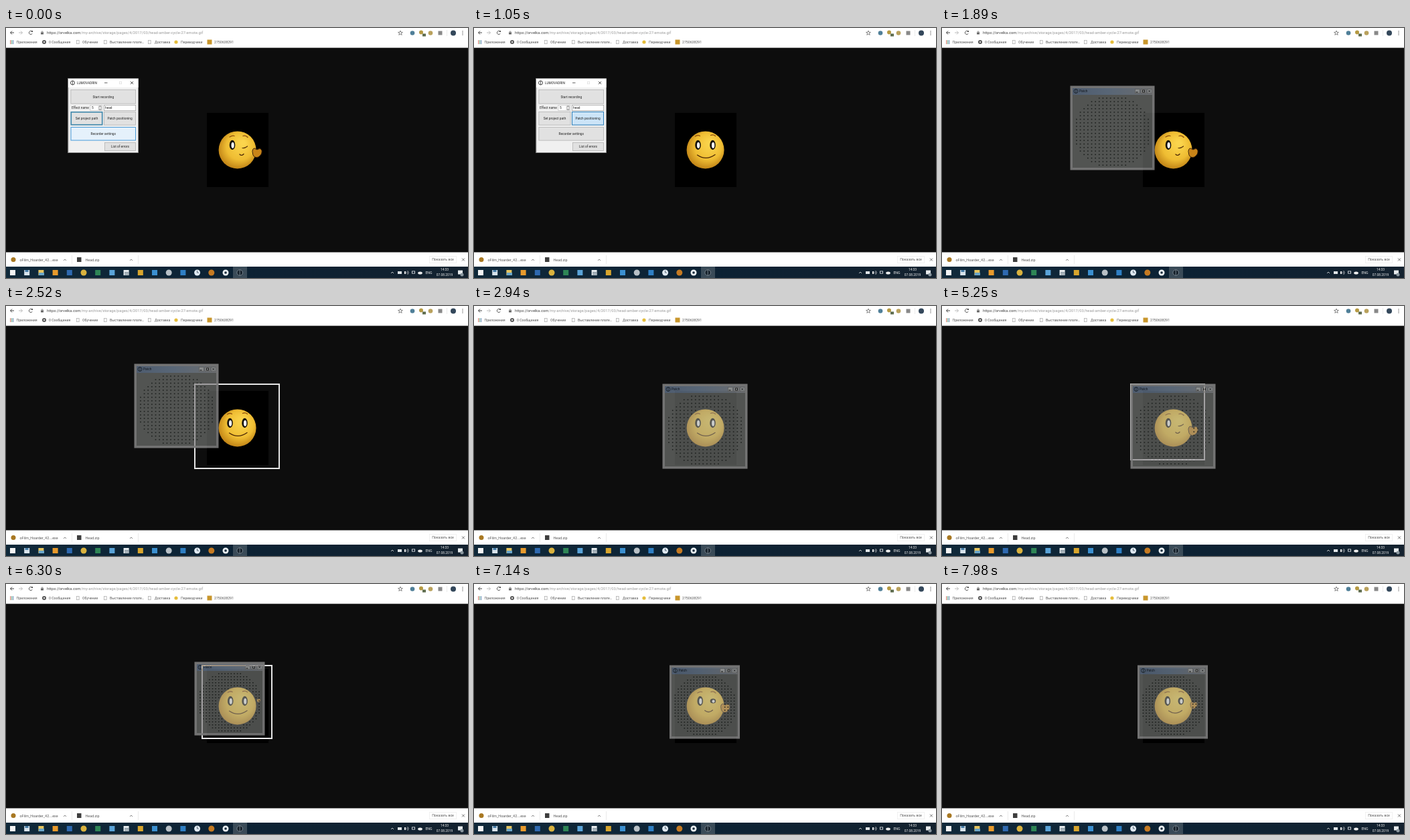
Write an HTML page with a canvas that moves like this. It is 690 by 374 pixels and loops after 8 s.

```html
<!DOCTYPE html>
<html lang="ru">
<head>
<meta charset="utf-8">
<style>
html, body { margin: 0; width: 690px; height: 374px; overflow: hidden; background: #0d0d0d; }
canvas { display: block; }
</style>
</head>
<body>
<canvas id="stage" width="690" height="374"></canvas>
<script>
const g = document.getElementById('stage').getContext('2d');
const LOOP = 8000, STEP = 210, FACE_LOOP = 1650;
const HEAD = { x: 345.6, y: 182.4, r: 28 };

const lerp = (a, b, k) => a + (b - a) * k;
const mix = (a, b, k) => a.map((v, i) => lerp(v, b[i], k));
const ramp = (t, from, to) => Math.min(1, Math.max(0, (t - from) / (to - from)));

function box(x, y, w, h, fill, edge, line = 1) {
  g.fillStyle = fill;
  g.fillRect(x, y, w, h);
  if (!edge) return;
  g.strokeStyle = edge;
  g.lineWidth = line;
  g.strokeRect(x + line / 2, y + line / 2, w - line, h - line);
}

function oval(x, y, rx, ry, fill) {
  g.fillStyle = fill;
  g.beginPath();
  g.ellipse(x, y, rx, ry, 0, 0, 7);
  g.fill();
}

const disc = (x, y, r, fill) => oval(x, y, r, r, fill);

function ring(x, y, r, color, width = 1, from = 0, to = 7) {
  g.strokeStyle = color;
  g.lineWidth = width;
  g.beginPath();
  g.arc(x, y, r, from, to);
  g.stroke();
}

function line(color, width, path) {
  g.strokeStyle = color;
  g.lineWidth = width;
  g.stroke(new Path2D(path));
}

function text(s, x, y, size = 5.2, color = '#555', align = 'left') {
  g.font = size + 'px Roboto, sans-serif';
  g.textAlign = align;
  g.textBaseline = 'middle';
  g.fillStyle = color;
  g.fillText(s, x, y);
  return g.measureText(s).width;
}

function cross(x, y, r, color) {
  line(color, .8, `M${x - r} ${y - r}l${2 * r} ${2 * r}m0 ${-2 * r}l${-2 * r} ${2 * r}`);
}

const caret = (x, y, color) => line(color, .8, `M${x - 2} ${y + 1}l2 -2l2 2`);

function page(x, y) {
  box(x - 2, y - 3, 4.5, 6, '#fafafa', '#aaa', .7);
}

function browser() {
  box(0, 0, 690, 29.6, '#fff');
  line('#444', 1, 'M12 7H6.5M9 4.5L6.5 7L9 9.5');
  line('#bbb', 1, 'M19 7h5.5M22 4.5L24.5 7L22 9.5');
  ring(37, 7, 2.6, '#555', 1, .5, 5.6);
  box(38, 4, 2, 2, '#555');
  box(52, 6.5, 4, 3, '#666');
  ring(54, 6.2, 1.3, '#666', .7, Math.PI, 7);
  const host = 'https://orvelka.com';
  const w = text(host, 61, 7.5, 5.8, '#444');
  text('/my-archive/storage/pages/4/2017/03/head-amber-cycle-27-emote.gif', 61 + w, 7.5, 5.8, '#999');
  line('#666', .8, 'M589 4l1 2.4h2.4l-2 1.5l.8 2.5l-2.2-1.5l-2.2 1.5l.8-2.5l-2-1.5h2.4z');
  disc(607, 7.5, 3.3, '#4f7f98');
  disc(620, 6.5, 3, '#b59a42');
  box(622, 8.5, 5, 4, '#5d6b4c');
  disc(634, 7.5, 3.3, '#b9a15c');
  box(645.5, 4.5, 6, 6, '#888');
  box(658, 3, .6, 9, '#ddd');
  disc(668, 7.5, 4, '#33475a');
  for (const y of [5, 7.5, 10]) disc(682, y, .7, '#555');

  for (let i = 0; i < 9; i++)
    box(6 + i % 3 * 2, 18.5 + Math.floor(i / 3) * 2, 1.4, 1.4, ['#c65', '#5a8', '#68b'][i % 3]);
  disc(57, 21, 3, '#555');
  disc(57, 21, 1.2, '#ddd');
  page(107, 21);
  page(148, 21);
  page(214, 21);
  disc(254, 21, 2.6, '#e5bd3b');
  box(300.5, 17.5, 7, 7, '#c8962c');
  const marks = [['Приложения', 15.5], ['0 Сообщения', 64], ['Обучение', 114], ['Выставление плате…', 155],
    ['Доставка', 222], ['Переводчики', 261], ['2750638291', 311]];
  for (const [s, x] of marks) text(s, x, 21.3);
}

function downloads() {
  box(0, 335.5, 690, 22, '#fff');
  disc(11, 346.5, 3.5, '#a87822');
  text('oFilm_Hoarder_42….exe', 20.5, 347.5, 5.4);
  box(106, 343, 6.5, 7, '#3d3d3d');
  text('Head.zip', 118.5, 347.5, 5.4);
  for (const x of [88, 187]) {
    caret(x, 347, '#666');
    box(x + 10, 340, .7, 13, '#e2e2e2');
  }
  box(632, 341, 41, 11, '#fff', '#ececec', .7);
  text('Показать все', 652.5, 346.7, 5.2, '#555', 'center');
  cross(683, 346.5, 2, '#555');
}

function taskbar() {
  const bg = g.createLinearGradient(0, 0, 690, 0);
  bg.addColorStop(0, '#10293a');
  bg.addColorStop(.5, '#0c2234');
  bg.addColorStop(1, '#14222f');
  box(0, 357, 690, 17, bg);
  box(339, 357, 21, 17, '#3a4b58');
  const apps = ['#f4f4f4', '#d7e3ec', '#e6c560', '#e89a2c', '#2f69b0', '#d9b23e', '#2f8656', '#5aa3d8', '#e8edf0',
    '#d8a52d', '#3b8fd0', '#b8c0c6', '#2f7fc4', '#dfe9f2', '#c57a22', '#e9eef1', '#15202a'];
  apps.forEach((c, i) => {
    const x = 10 + i * 21.2;
    if ([5, 11, 13, 14, 15, 16].includes(i)) disc(x, 366, 4.5, c);
    else box(x - 4, 362, 8, 8, c);
  });
  box(28.5, 362, 5, 3, '#477ea8');
  box(49, 366, 8, 4, '#6aa5c9');
  for (let i = 0; i < 9; i++) box(177.5 + i % 3 * 2, 365 + Math.floor(i / 3) * 1.7, 1.2, 1, '#274052');
  line('#345', .8, 'M285.6 363v3h2.2');
  disc(328, 366, 1.8, '#10293a');
  ring(349.2, 366, 4.3, '#8d9ba5', .8);
  line('#8d9ba5', .8, 'M349.2 362v8');

  caret(577, 366, '#eee');
  box(585, 364, 6, 4, '#dfe5e8');
  box(595, 364, 2, 4, '#eee');
  for (const r of [2, 4]) ring(597, 366, r, '#eee', .7, -.8, .8);
  box(606, 363.5, 5, 4, '#0c2234', '#eee', .8);
  oval(618.5, 366.5, 3.3, 2, '#eee');
  text('ENG', 631.5, 366, 5.2, '#eee', 'center');
  text('14:33', 655, 361.8, 4.9, '#eee', 'center');
  text('07.08.2019', 655, 370, 4.9, '#eee', 'center');
  box(675, 362.5, 7, 6, '#e8ecee');
  disc(681, 369, 2.5, '#8a979f');
}

function face(t) {
  const p = t % FACE_LOOP / FACE_LOOP;
  const cycle = (a, b, c, d) => p > .6 ? ramp(p, a, b) : 1 - ramp(p, c, d);
  const turn = cycle(.81, .85, .32, .42);
  const wink = cycle(.82, .87, .3, .4);

  box(300, 127, 92, 111, '#000');
  const skin = g.createRadialGradient(354, 172, 3, 347, 180, 32);
  skin.addColorStop(0, '#fbd54d');
  skin.addColorStop(.6, '#efbd33');
  skin.addColorStop(1, '#bd7f14');
  disc(HEAD.x, HEAD.y, HEAD.r, skin);

  g.lineCap = 'round';
  const lx = 334.5 + 3.5 * turn, rx = 356.5 + turn / 2;
  line('#8a4a0c', 1.3, `M${lx - 4} ${162 + turn}q4 -2.5 7 -${.5 + turn}`);
  line('#8a4a0c', 1.3, `M${rx - 3} ${160.5 + turn}q4 -1.5 7 ${1 + wink}`);
  const eye = (x, open) => {
    oval(x, 175, 4.3, 7.2 * open, '#17130d');
    oval(x + .6, 175.5, 2.1, 4.4 * open, '#fff');
  };
  eye(lx, 1);
  if (wink < .8) eye(rx, 1 - wink * .7);
  else line('#5b370a', 1.2, 'M353 179.5q4 .5 7.5 -2.5');
  const [x0, y0, x1, sag] = mix([333.5, 190, 360, 9], [349, 189, 355, 3], wink);
  line('#4a2605', 1.3, `M${x0} ${y0}Q${(x0 + x1) / 2} ${y0 + sag} ${x1} ${y0 - .5}`);

  if (turn > 0) {
    g.save();
    g.translate(lerp(378, 375, turn), lerp(171, 186, turn));
    g.scale(lerp(.2, 1, turn), lerp(.2, 1, turn));
    const hand = new Path2D('M-7 -2Q-6 -8 -2 -5Q0 -3 2 -5Q5 -7 7 -3Q8 3 2 7Q-4 9 -6 4Z');
    g.fillStyle = '#c98418';
    g.fill(hand);
    g.strokeStyle = '#38210a';
    g.lineWidth = 1;
    g.stroke(hand);
    g.restore();
  }
  g.lineCap = 'butt';
}

function button(label, x, y, w, h, state) {
  const [fill, edge, width] = {
    hover: ['#e5f1fb', '#4a9bd8', 1],
    press: ['#cce4f7', '#2f7fb8', 1],
    focus: ['#e1e1e1', '#3f87ab', 1.6]
  }[state] || ['#e1e1e1', '#b4b4b4', .8];
  box(x, y, w, h, fill, edge, width);
  text(label, x + w / 2, y + h / 2 + .5, 4.8, '#222', 'center');
}

function dialog(t) {
  const early = t < 630;
  box(92.5, 75, 105.5, 112, '#f0f0f0', '#777', .8);
  box(93, 76, 104.5, 13, '#fff');
  ring(99.5, 82, 3, '#444', 1);
  line('#444', .8, 'M99.5 79v6');
  text('LUMOVADRIN', 106, 82.5, 4.8, '#222');
  line('#333', .8, 'M147 82h4.5');
  box(169, 80, 4, 4, '#fff', '#ddd', .7);
  cross(188, 82, 2.1, '#333');
  button('Start recording', 96.5, 92, 97.5, 21.5);
  text('Effect name', 98, 119.3, 4.8, '#222');
  box(125.5, 115, 18.5, 9, '#fff', '#bbb', .7);
  text('5', 128, 119.8, 4.8, '#222');
  box(137.5, 116, 6, 7, '#e4e4e4');
  caret(140.5, 117.5, '#555');
  line('#555', .8, 'M138.5 121l2 1.5l2 -1.5');
  box(146, 115, 48, 9, '#fff', '#999', .7);
  text('head', 148, 119.8, 4.8, '#222');
  button('Set project path', 96.5, 125, 48, 20.5, early && 'focus');
  button('Patch positioning', 146, 125, 48, 20.5, !early && 'press');
  button('Recorder settings', 96.5, 148, 97.5, 20.5, early && 'hover');
  button('List of errors', 147, 171, 47, 13);
}

function patch(x, y, w, h) {
  const bar = g.createLinearGradient(x, 0, x + w, 0);
  bar.addColorStop(0, 'rgba(130,155,190,.55)');
  bar.addColorStop(.45, 'rgba(150,175,205,.55)');
  bar.addColorStop(1, 'rgba(185,187,190,.55)');
  g.strokeStyle = 'rgba(190,190,190,.58)';
  g.lineWidth = 3.5;
  g.strokeRect(x + 2.25, y + 2.25, w - 4.5, h - 4.5);
  box(x + 4, y + 4, w - 8, 10, bar);
  const ix = x + 4, iy = y + 14, iw = w - 8, ih = h - 18;
  box(ix, iy, iw, ih, 'rgba(150,154,150,.51)');
  ring(x + 9, y + 8.5, 3, '#1c242c', 1);
  line('#1c242c', .8, `M${x + 9} ${y + 5.5}v6`);
  text('Patch', x + 14, y + 8.8, 4.8, '#11161c');
  for (let i = 0; i < 3; i++) box(x + w - 30 + i * 9, y + 5, 7.5, 7, '#898c8d', '#555', .7);
  line('#111', 1, `M${x + w - 28.5} ${y + 10}h3`);
  box(x + w - 19, y + 6.5, 4, 4, '#898c8d', '#111', .9);
  cross(x + w - 8.3, y + 8.5, 1.6, '#111');

  for (let r = 0; r < 20; r++)
    for (let c = 0; c < 20; c++) {
      const dx = ix + iw * lerp(.05, .95, c / 19), dy = iy + ih * lerp(.045, .965, r / 19);
      const inside = Math.hypot(r - 9.5, c - 9.5) < 10.15;
      if (inside && Math.hypot(dx - HEAD.x, dy - HEAD.y) > HEAD.r + 1)
        box(dx - .8, dy - .7, 1.6, 1.4, '#181b19');
    }
}

// Each drag shows an outline from start to drop; the window follows on drop.
const first = [191, 86, 127, 127];
const drags = [
  { start: 1890, end: 2520, drop: 2730, to: [281, 116, 128, 128] },
  { start: 4620, end: 5460, drop: 5670, to: [281, 116, 106, 111] },
  { start: 5670, end: 6300, drop: 6510, to: [291.5, 121, 106, 111] }
];

function patchAndOutline(t) {
  let at = first, outline;
  for (const d of drags) {
    if (t >= d.drop) at = d.to;
    else if (t > d.start) outline = mix(at, d.to, ramp(t, d.start, d.end));
  }
  patch(...at);
  if (!outline) return;
  const [x, y, w, h] = outline.map(Math.round);
  g.globalCompositeOperation = 'difference';
  g.strokeStyle = '#f2f2f2';
  g.lineWidth = 2;
  g.strokeRect(x + 1, y + 1, w - 2, h - 2);
  g.globalCompositeOperation = 'source-over';
}

function draw(now) {
  const t = Math.floor(now % LOOP / STEP) * STEP;
  box(0, 0, 690, 374, '#0d0d0d');
  browser();
  downloads();
  taskbar();
  face(t);
  if (t < 1470) dialog(t);
  else patchAndOutline(t);
}

const begin = performance.now();
function tick() {
  draw(performance.now() - begin);
  requestAnimationFrame(tick);
}
tick();
</script>
</body>
</html>
```
